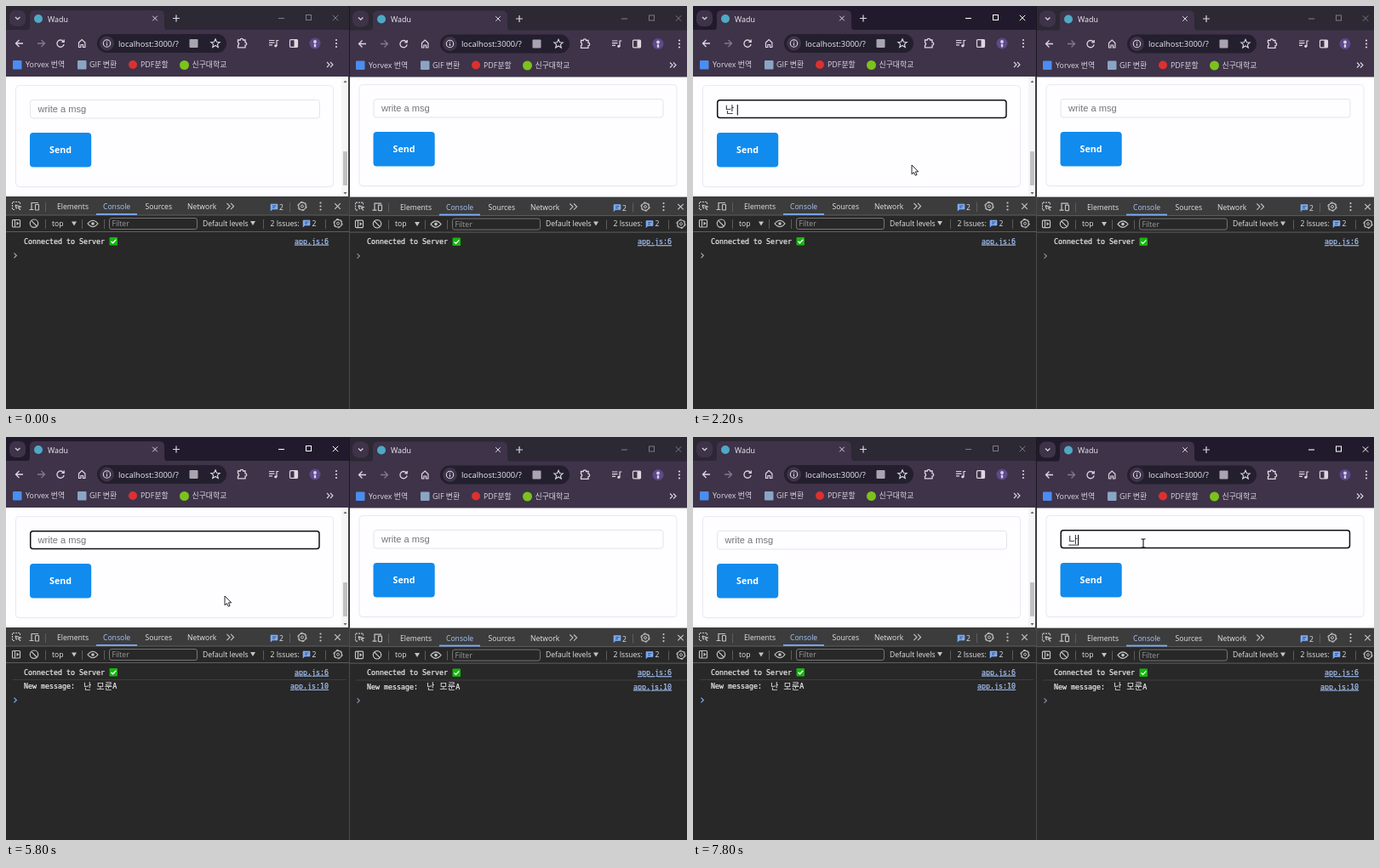
Write an HTML page that moves like this. It is 800 px wide and 474 px high and loops after 8000 ms.

```html
<!DOCTYPE html>
<html lang="ko">
<head>
<meta charset="utf-8">
<style>
  html, body { margin: 0; width: 100%; height: 100%; overflow: hidden; background: #282828; }
  svg { display: block; }
  text { white-space: pre; font-family: 'Open Sans', 'Noto Sans CJK KR', 'Noto Sans CJK', sans-serif; }
  .mono { font-family: 'DejaVu Sans Mono', 'Noto Sans CJK KR', 'Noto Sans CJK', monospace; }
  .field { font-family: 'Liberation Sans', 'Noto Sans CJK KR', 'Noto Sans CJK', sans-serif; }
</style>
</head>
<body>
<svg id="stage" width="800" height="474" viewBox="0 0 800 474"></svg>
<script>
const stage = document.getElementById('stage');
const LOOP = 8000, STEP = 200;
const SENT = 5200, RIGHT_X = 403;
const INK = '#dcd7e2', GREY = '#c4c4c4', BLUE = '#7cacf8', LINK = '#a8c7fa', PAPER = '#fefdff';

const rect = (x, y, w, h, fill, r = 0, more = '') =>
  `<rect x="${x}" y="${y}" width="${w}" height="${h}" fill="${fill}" rx="${r}" ${more}/>`;
const circle = (x, y, r, fill, more = '') =>
  `<circle cx="${x}" cy="${y}" r="${r}" fill="${fill}" ${more}/>`;
const line = (d, stroke, width = 1.1, fill = 'none', more = '') =>
  `<path d="${d}" stroke="${stroke}" stroke-width="${width}" fill="${fill}" ${more}/>`;
const label = (x, y, text, size, fill, more = '') =>
  `<text x="${x}" y="${y}" font-size="${size}" fill="${fill}" ${more}>${text}</text>`;
const shift = (x, y, body) => `<g transform="translate(${x} ${y})">${body}</g>`;
const stroke = (color, width = 1.1) => `stroke="${color}" stroke-width="${width}"`;

const dots = (x, y, color) => [-4, 0, 4].map(d => circle(x, y + d, 1.1, color)).join('');
const cross = (x, y, s, color, w = 1) =>
  line(`M${x - s} ${y - s}l${2 * s} ${2 * s}m0 ${-2 * s}l${-2 * s} ${2 * s}`, color, w);
const guillemet = (x, y, s, color) =>
  line(`M${x - s} ${y - s}l${s} ${s}l${-s} ${s}m${s + 1} ${-2 * s}l${s} ${s}l${-s} ${s}`, color);
const gear = (x, y) => circle(x, y, 4.3, 'none', stroke(GREY, 1.2)) +
  circle(x, y, 5.2, 'none', stroke(GREY, 0.9) + ' stroke-dasharray="2.7 2.74"') +
  circle(x, y, 1.5, 'none', stroke(GREY, 1));
const bubble = (x, y) => line(`M${x} ${y}h8v6h-6l-2 2z`, BLUE, 0.6, BLUE) +
  line(`M${x + 2} ${y + 2}h4.5m-4.5 2h3`, '#2c3b55', 0.8);
const separators = (y, xs) => xs.map(x => rect(x, y - 5, 1, 11, '#5c5c5c')).join('');

function header(active) {
  const control = active ? '#ffffff' : '#7d7884';
  const bookmark = (x, text) => label(x, 72.3, text, 8.9, INK);
  return rect(0, -1, 403, 31, active ? '#211a2c' : '#2c2834') +
    rect(0, 28, 403, 55, '#3e3349') +
    // tab strip
    rect(4, 5, 19, 19, '#3e3349', 7) + line('M11 13l2.7 2.7l2.7-2.7', INK, 1.3) +
    line('M23 29q5 0 5-6v-12q0-6 6-6h146q6 0 6 6v12q0 6 5 6z', 'none', 0, '#3e3349') +
    circle(38, 15, 5, '#4fa9c4') + label(49, 18.5, 'Wadu', 8.9, '#f0edf4') +
    cross(175, 14.5, 2.8, INK) + line('M196 14.5h8m-4-4v8', INK, 1.2) +
    line('M320 14.5h7', control) + rect(352.5, 10.5, 6, 6, 'none', 0, stroke(control, 1)) +
    cross(387, 14, 3.2, control) +
    // toolbar
    line('M20 44h-8.5m4-4l-4 4l4 4', INK, 1.3) +
    line('M37 44h8.5m-4-4l4 4l-4 4', '#82798b', 1.3) +
    line('M67.3 41.6a4.1 4.1 0 1 0 .8 3.2M68.2 39.5v2.8h-2.8', INK, 1.3) +
    line('M85.5 43l3.7-3.5l3.7 3.5v5.5h-2.4v-3h-2.6v3h-2.4z', INK, 1.2) +
    rect(107, 33, 152, 22, '#241f2e', 11) + circle(118.5, 44, 8.5, '#3e3349') +
    circle(118.5, 44, 4.2, 'none', stroke(INK)) + line('M118.5 43.4v3m0-4.8v1', INK) +
    label(132, 47.5, 'localhost:3000/?', 9.4, '#eeeaf3') +
    rect(215.5, 39, 10, 10, '#aaa4b1', 1) +
    line('M246 38.8l1.5 3.4l3.7.3l-2.8 2.4l.9 3.6l-3.3-2l-3.3 2l.9-3.6l-2.8-2.4l3.7-.3z', INK) +
    line('M272.5 40h2.7a1.7 1.7 0 0 1 3.4 0h2.4v2.8a1.7 1.7 0 0 1 0 3.4v2.6h-8.5v-2.7a1.7 1.7 0 0 0 0-3.2z', INK, 1.3) +
    line('M309 40.5h6.5m-6.5 2.7h6.5m-6.5 2.7h4M318 47v-6.5h2.3', INK, 1.2) +
    circle(316.8, 46.8, 1.6, INK) +
    rect(333.5, 39.7, 9, 8.6, 'none', 1, stroke(INK, 1.2)) + rect(338.5, 39.7, 4, 8.6, INK) +
    circle(363, 44, 6.5, '#5b4b8a') + circle(363, 42, 1.9, '#d8d2e6') +
    rect(361.8, 44.5, 2.4, 4, '#d8d2e6', 1) + dots(388, 44, INK) +
    // bookmarks
    rect(8, 64, 10.5, 10.5, '#4b8df0', 1) + bookmark(23, 'Yorvex 번역') +
    rect(84, 64, 10.5, 10.5, '#8aa5c4', 1) + bookmark(98, 'GIF 변환') +
    circle(149, 69, 5, '#dd3030') + bookmark(158, 'PDF분할') +
    circle(209.5, 69.5, 5.5, '#7cc21c') + bookmark(218.5, '신구대학교') +
    guillemet(380, 69, 3, INK);
}

const ruler = document.createElement('canvas').getContext('2d');
ruler.font = "11.5px 'Liberation Sans', 'Noto Sans CJK KR', 'Noto Sans CJK', sans-serif";
const widthOf = text => ruler.measureText(text).width;

function page({ value, focused, caret }) {
  const end = 37.7 + widthOf(value);
  let field = focused
    ? rect(28.7, 110.7, 339.3, 20.8, PAPER, 3, stroke('#101010', 1.5))
    : rect(28.5, 110.5, 340, 21.5, PAPER, 3, stroke('#e4e4ea', 1));
  field += value
    ? label(37.7, 125.5, value, 11.5, '#1c1c1c', 'class="field"')
    : label(37.5, 124.5, 'write a msg', 11.1, '#757575', 'class="field"');
  if (/[ㄱ-힣]$/.test(value)) {
    const start = end - widthOf(value.slice(-1));
    field += rect(start, 127.6, end - start, 0.9, '#1c1c1c');
  }
  if (caret) field += rect(end + 0.3, 116, 1, 12.5, '#000');
  return rect(11.5, 94.5, 373, 119, '#f6f6fa', 4) +
    rect(11.5, 93.5, 373, 119, PAPER, 4, stroke('#e9e9f0', 1)) + field +
    rect(28, 149, 72.2, 40.6, '#118bee', 4) +
    label(51, 173.3, 'Send', 10.7, '#fff', 'font-weight="700"');
}

const scrollbar = rect(394, 83, 9, 141, '#f5f5f5') + rect(396, 171, 5, 40, '#c1c1c1') +
  line('M396.5 90l2-2.5l2 2.5z', 'none', 0, '#606060') +
  line('M396.5 219l2 2.5l2-2.5z', 'none', 0, '#606060');

function devtools(sent, promptColor) {
  const menu = (x, y, text, color = '#e3e3e3') => label(x, y, text, 8.6, color);
  const triangle = (x, y) => line(`M${x - 3} ${y - 2.5}h6l-3 5z`, 'none', 0, GREY);
  const mono = (x, y, text, color, more = '') =>
    label(x, y, text, 8.3, color, `class="mono" stroke="${color}" stroke-width=".2" ${more}`);
  const log = (x, y, text) => mono(x, y, text, '#f0f0f0');
  const source = (y, text) => mono(379, y, text, LINK, 'text-anchor="end" text-decoration="underline"');
  const hangul = (x, text) => label(x, 296.5, text, 10.2, '#f0f0f0', 'class="mono"');
  const promptY = sent ? 309.5 : 293.5;
  let out = rect(0, 245, 403, 229, '#282828') + rect(0, 224, 403, 22, '#3c3c3c') +
    rect(0, 245.5, 403, 1, '#5e5e5e') + rect(0, 265, 403, 1, '#5e5e5e') +
    // panel tabs
    line('M10 239.5h-2.5v-9h9v2.5', GREY, 1.1, 'none', 'stroke-dasharray="2 1"') +
    line('M11 234l6 2l-2.5 1.2l2.5 2.6m-4.5-1.3l-1.5-4.5', GREY, 1.3) +
    line('M30 239v-7.5h8M27.5 239.5h5', GREY, 1.2) +
    rect(34.5, 233.5, 4, 6.5, 'none', 0.5, stroke(GREY)) + separators(236, [46, 333]) +
    menu(60, 239.3, 'Elements') + menu(114, 239.3, 'Console', LINK) +
    menu(163.5, 239.3, 'Sources') + menu(213, 239.3, 'Network') +
    rect(106, 244, 48, 1.8, BLUE) + guillemet(263, 235.5, 3.6, GREY) +
    bubble(311, 233) + menu(321, 240, '2') +
    gear(348, 235.5) + dots(369.5, 235.5, GREY) + cross(389.5, 235.5, 3.3, GREY, 1.2) +
    // console toolbar
    rect(7.5, 251.5, 9, 8.5, 'none', 1, stroke(GREY, 1.2)) + line('M10.5 251.5v8.5', GREY) +
    line('M12.5 253.5l3 2.2l-3 2.2z', 'none', 0, GREY) +
    circle(33, 255.7, 4.7, 'none', stroke(GREY, 1.2)) + line('M29.7 252.4l6.6 6.6', GREY, 1.2) +
    separators(256, [46, 89, 115, 302, 375]) +
    menu(54, 258.8, 'top') + triangle(80, 256) +
    line('M96 256q6-7.5 12 0q-6 7.5-12 0z', GREY, 1.2) + circle(102, 256, 1.8, GREY) +
    rect(121.5, 249.5, 103, 13, '#282828', 2.5, stroke('#757575', 1)) + menu(124.5, 259.3, 'Filter', '#9b9b9b') +
    menu(231, 258.8, 'Default levels') + triangle(290, 255.5) +
    menu(310.5, 258.8, '2 Issues:') + bubble(349, 252) + menu(359.5, 258.8, '2') + gear(390, 255.7) +
    // messages
    log(21, 279.7, 'Connected to Server') + rect(121.5, 272, 9.5, 9.5, '#16b60e', 1) +
    line('M123.5 276.8l2 2l3.8-4', '#fff', 1.3) + source(279.7, 'app.js:6');
  if (sent) {
    out += rect(8, 285, 392, 0.8, '#444') + log(21, 296, 'New message:') +
      hangul(91, '난') + hangul(106.3, '모룬') + log(125.2, 296, 'A') + source(296, 'app.js:10');
  }
  return out + line(`M9.5 ${promptY - 2.8}l2.8 2.8l-2.8 2.8`, promptColor, 1.2);
}

// what each input holds, from the moment it gets focus
const typing = [
  [[800, ''], [1600, 'ㄴ'], [1800, '나'], [2000, '난'], [2200, '난 '], [3600, '난 ㅁ'], [3800, '난 모'],
   [4000, '난 모루'], [4200, '난 모룬'], [4600, '난 모룬A'], [SENT, '']],
  [[6800, ''], [7600, 'ㄴ'], [7800, '나']]
];
const focusSpan = [[800, 6600], [6800, LOOP]];
const activeSpan = [[800, 6800], [6800, LOOP]];
const within = (t, [from, to]) => t >= from && t < to;

function inputState(side, t) {
  const focused = within(t, focusSpan[side]);
  const last = typing[side].filter(([time]) => time <= t).pop();
  if (!focused || !last) return { value: '', focused, caret: false };
  return { value: last[1], focused, caret: (t - last[0]) % 1200 < 600 };
}

const route = [[200, 330, 346], [400, 284, 210], [600, 246, 122], [800, 246, 122], [1200, 257, 187],
  [5800, 257, 187], [6400, 528, 125], [LOOP, 528, 125]];

function pointer(t) {
  if (t < route[0][0]) return '';
  const i = route.findIndex(p => p[0] > t);
  const [t0, x0, y0] = route[i - 1], [t1, x1, y1] = route[i];
  const u = (t - t0) / (t1 - t0), k = u * u * (3 - 2 * u);
  const x = x0 + (x1 - x0) * k, y = y0 + (y1 - y0) * k;
  const overInput = y > 110 && y < 132 && (x > 28 && x < 368 || x > 431 && x < 772);
  const click = t === 600 || t === 6600 ? circle(-0.5, -0.5, 2.3, 'none', stroke('#e02020', 1.2)) : '';
  const shape = overInput
    ? click + line('M-1.5-5h1.8l.7.6l.7-.6h1.8M1-4.6v9.2M-1.5 5h1.8l.7-.6l.7.6h1.8', '#111', 1.1)
    : line('M0 0v10.8l2.5-2.2l1.7 3.7l1.9-.9l-1.7-3.5h3.3z', '#111', 0.9, '#fff');
  return shift(x, y, shape);
}

function browser(side, t) {
  const sent = t >= SENT;
  const promptColor = side ? '#8592ad' : sent ? BLUE : '#a4a8ae';
  return shift(side * RIGHT_X, 0,
    rect(0, 80, 403, 146, PAPER) +
    shift(0, side * 0.5, header(within(t, activeSpan[side]))) +
    shift(side * 0.5, -side, page(inputState(side, t))) + (side ? '' : scrollbar) +
    shift(0, side * 0.6, devtools(sent, promptColor)));
}

const divider = rect(403, 0, 1, 83, '#1b1722') + rect(402, 83, 2, 141, '#3b3b3b') +
  rect(403, 224, 1, 250, '#4b4b4b');

let shown = -1;
function draw() {
  const t = Math.floor(performance.now() % LOOP / STEP) * STEP;
  if (t !== shown) {
    shown = t;
    stage.innerHTML = browser(0, t) + browser(1, t) + divider + pointer(t);
  }
  requestAnimationFrame(draw);
}
draw();
</script>
</body>
</html>
```
